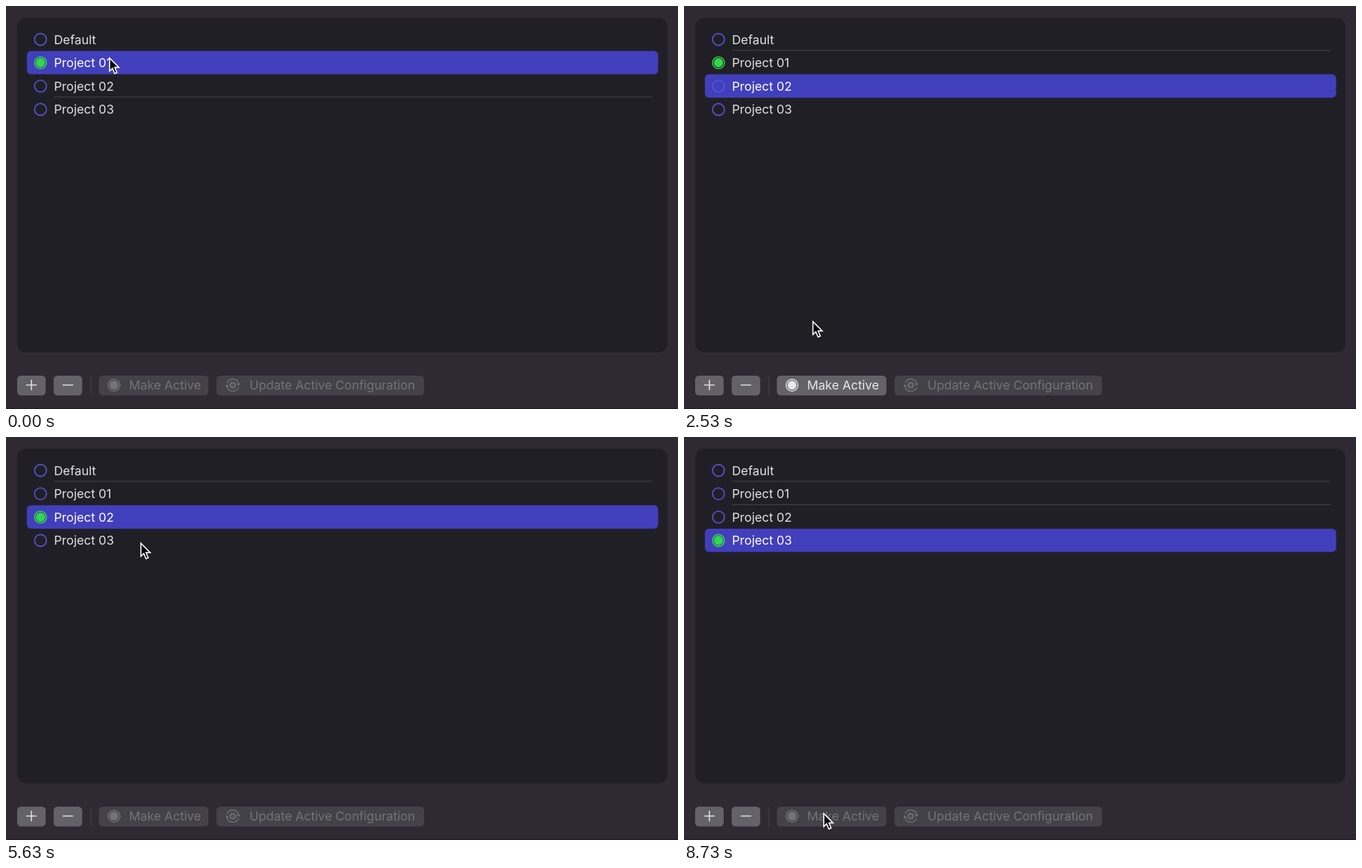
Write an HTML page that moves like this. It is 966 by 580 pixels and loops after 9040 ms.

```html
<!DOCTYPE html>
<html lang="en">
<head>
<meta charset="utf-8">
<title>Configurations</title>
<style>
html, body { margin: 0; width: 100%; height: 100%; overflow: hidden; background: #2e2932; }
svg { display: block; width: 966px; height: 580px; }
text { font: 17.8px Inter, "Open Sans", sans-serif; white-space: pre; }
</style>
</head>
<body>
<svg id="stage" viewBox="0 0 966 580"></svg>
<script>
const LOOP = 9040, ROW_H = 33.6, ROW_TOP = 31.1;
const NAMES = ["Default", "Project 01", "Project 02", "Project 03"];
const PURPLE = [94, 84, 222], GREEN = [50, 215, 75];
const BTN_OFF = [69, 65, 72], BTN_ON = [101, 97, 104], BTN_DOWN = [128, 125, 131];
const INK_OFF = [117, 114, 120], INK_ON = [232, 231, 233];

// Row selections, button presses and the resulting change of active row
const SELECT = [[0, 1], [1700, 2], [6070, 3]];
const PRESS = [{ down: 3470, up: 3600, from: 1, to: 2 }, { down: 8100, up: 8370, from: 2, to: 3 }];
const FADE = 350, ENABLE = 200;

// Cursor moves: start, end, x, y, ease-in power, ease-out power, sideways bulge
const MOVES = [
  [30, 430, 137, 106.5, 1.5, 2.4, 0],
  [600, 670, 137, 107.5, 1, 1, 0],
  [1600, 1630, 137, 109, 1, 1, 0],
  [2100, 3000, 197, 543, 1.3, 3.23, 0],
  [3070, 3100, 197.5, 544, 1, 1, 0],
  [3270, 3300, 197, 545, 1, 1, 0],
  [4800, 5630, 193, 151, 1.5, 2.4, 9],
  [6800, 7700, 195, 533, 1.6, 2.14, 0],
  [7730, 7830, 200, 540, 1, 1.5, 0]
];

const stage = document.getElementById("stage");

function add(tag, attrs, parent = stage) {
  const el = document.createElementNS("http://www.w3.org/2000/svg", tag);
  set(el, attrs);
  parent.appendChild(el);
  return el;
}
function set(el, attrs) {
  for (const k in attrs) el.setAttribute(k, attrs[k]);
}
function label(x, y, str, fill) {
  const el = add("text", { x, y, fill });
  el.textContent = str;
  return el;
}
const clamp = u => Math.max(0, Math.min(1, u));
const smooth = u => u * u * (3 - 2 * u);
const rgb = c => `rgb(${c.map(Math.round)})`;
const mix = (a, b, u) => a.map((v, i) => v + (b[i] - v) * u);
const button = (x, w, fill) => add("rect", { x, y: 532, width: w, height: 28.5, rx: 5.5, fill: rgb(fill) });

// Window and list
add("rect", { width: 966, height: 580, fill: "#2e2932" });
add("rect", { y: 579, width: 966, height: 1, fill: "#1d1a20" });
add("rect", { x: 16, y: 17, width: 935, height: 481.5, rx: 13, fill: "#211f26" });
const lines = [0, 1, 2].map(i =>
  add("rect", { x: 69, y: ROW_TOP + ROW_H * (i + 1) - 1.5, width: 860, height: 1.2, fill: "#424047" }));
const bar = add("rect", { x: 30, width: 907.5, height: ROW_H, rx: 6, fill: "#413fbb" });
const rows = NAMES.map((name, i) => {
  const cy = ROW_TOP + ROW_H * (i + 0.5) + 0.2;
  return {
    ring: add("circle", { cx: 49.6, cy, r: 8.5, fill: "none", "stroke-width": 1.6 }),
    dot: add("circle", { cx: 49.6, cy, r: 6.6 }),
    text: label(69, cy + 6.4, name, "#fff")
  };
});

// Toolbar
button(16, 41, BTN_ON);
button(68.5, 41, BTN_ON);
add("path", { d: "M29.5 545.5h14M36.5 538.5v14M82 545.5h14", stroke: "#e4e3e5", "stroke-width": 1.6, "stroke-linecap": "round" });
add("rect", { x: 121.5, y: 532.5, width: 1.2, height: 27.5, fill: "#443f48" });

const makeBtn = button(133.5, 157.5, BTN_OFF);
const makeRing = add("circle", { cx: 155.3, cy: 545.7, r: 8.5, fill: "none", "stroke-width": 1.5 });
const makeDot = add("circle", { cx: 155.3, cy: 545.7, r: 6.4 });
const makeText = label(177, 552, "Make Active");

button(302.5, 298.5, BTN_OFF);
const gear = add("g", { transform: "translate(326 545.7)", stroke: rgb(INK_OFF), fill: "none", "stroke-width": 1.4 });
add("path", { d: "M-8.1 -3.2A8.7 8.7 0 0 1 8.2 -2.8M8.1 3.2A8.7 8.7 0 0 1 -8.2 2.8" }, gear);
add("path", { d: "M5.6 -2.4h5.2l-2.6 3.8zM-5.6 2.4h-5.2l2.6 -3.8z", fill: rgb(INK_OFF), stroke: "none" }, gear);
add("circle", { r: 3.3, "stroke-width": 1.6 }, gear);
add("circle", { r: 4.5, "stroke-width": 1.3, "stroke-dasharray": "1.77 1.77" }, gear);
add("circle", { r: 1, fill: rgb(INK_OFF), stroke: "none" }, gear);
label(350, 552, "Update Active Configuration", rgb(INK_OFF));

const cursor = add("path", {
  d: "M.9 1.9V20.6L5.1 16.6L8.3 24.2L11.5 22.8L8.3 15.4H14.3Z",
  fill: "#000", stroke: "#fff", "stroke-width": 1.6, "stroke-linejoin": "miter"
});

function cursorAt(t) {
  let x = 148, y = 73;
  for (const [t0, t1, tx, ty, a, b, bulge] of MOVES) {
    if (t < t0) break;
    const u = clamp((t - t0) / (t1 - t0));
    const e = 1 - (1 - u ** a) ** b;
    x += (tx - x) * e + bulge * Math.sin(Math.PI * e);
    y += (ty - y) * e;
  }
  return [x, y];
}

function render(t) {
  const [since, sel] = SELECT.filter(s => t >= s[0]).pop();

  // How active each row is, 0 to 1
  const active = [0, 1, 0, 0];
  for (const p of PRESS) {
    const u = smooth(clamp((t - p.up) / FADE));
    if (t >= p.up) { active[p.from] = 1 - u; active[p.to] = u; }
  }

  set(bar, { y: ROW_TOP + ROW_H * sel });
  lines.forEach((el, i) => set(el, { opacity: i === sel || i + 1 === sel ? 0 : 1 }));
  rows.forEach((row, i) => {
    const c = rgb(mix(PURPLE, GREEN, active[i]));
    set(row.ring, { stroke: c });
    set(row.dot, { fill: c, opacity: active[i] });
    set(row.text, { fill: i === sel ? "#fff" : "#e2e1e3" });
  });

  // Button: fades in on selection, lights up while held, fades out on release
  let ink = 0, face = BTN_OFF;
  if (sel > 1) {
    const p = PRESS[sel - 2];
    const on = smooth(clamp((t - since) / ENABLE));
    if (t < p.up) {
      ink = on;
      face = mix(mix(BTN_OFF, BTN_ON, on), BTN_DOWN, clamp((t - p.down) / 70));
    } else {
      ink = 1 - smooth(clamp((t - p.up) / FADE));
    }
  }
  const inkColor = rgb(mix(INK_OFF, INK_ON, ink));
  set(makeBtn, { fill: rgb(face) });
  set(makeRing, { stroke: inkColor });
  set(makeDot, { fill: inkColor });
  set(makeText, { fill: inkColor });

  const [x, y] = cursorAt(t);
  set(cursor, { transform: `translate(${x.toFixed(2)} ${y.toFixed(2)})` });
}

const start = performance.now();
function frame() {
  render((performance.now() - start) % LOOP);
  requestAnimationFrame(frame);
}
render(0);
requestAnimationFrame(frame);
</script>
</body>
</html>
```
